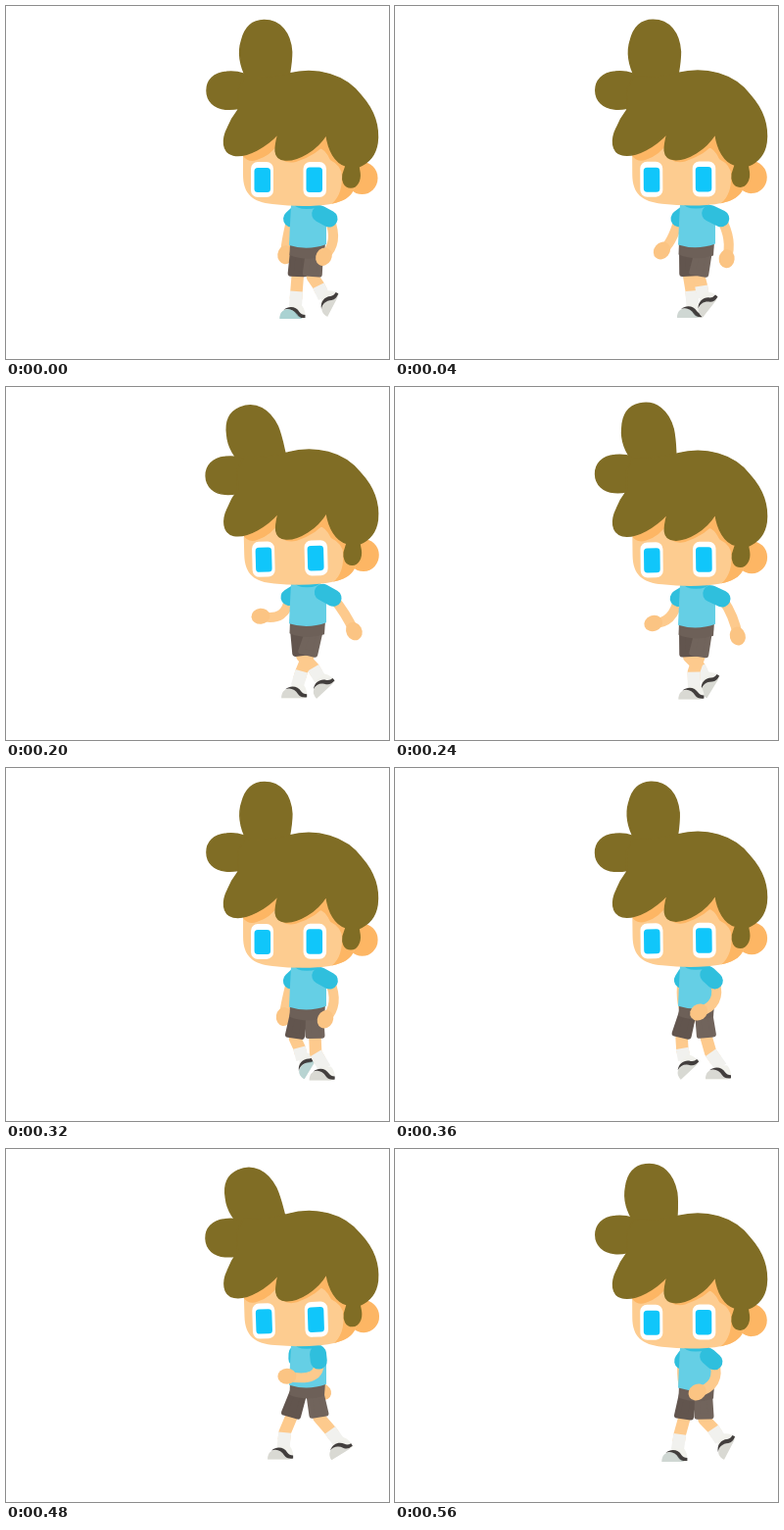
These frames come from a looping animation (391x360 px, 0.6 s). An HTML page:

```html
<!DOCTYPE html>
<html lang="en">
<head>
<meta charset="utf-8">
<title>Walking boy</title>
<style>
html, body { margin: 0; width: 100%; height: 100%; overflow: hidden; background: #fff; }
svg { display: block; width: 391px; height: 360px; }
.line { fill: none; stroke-linejoin: round; }
.skin { stroke: #fdca8d; }
.hand { fill: #fbc483; }
.sock { stroke: #f1f1ee; stroke-width: 13; }
.sleeve { stroke: #2fbfdd; stroke-width: 17; stroke-linecap: round; }
.short { stroke-width: 6; stroke-linejoin: round; }
.hair { fill: #806d25; stroke: #806d25; stroke-width: 1.5; }
.shade { fill: #fdb664; }
</style>
</head>
<body>
<svg viewBox="0 0 391 360">
  <defs>
    <clipPath id="faceClip"><path id="face" d="M242 120V172C242 192 252 200 272 202Q296 205 318 203.500C342 202 353 196 356 184L357 120Z"/></clipPath>
    <g id="shoe">
      <path d="M-13 7C-13 1 -6 -4 0 -7L9 -7C13 -3 13.500 3 13 7Z" fill="#f1f1ec"/>
      <path d="M-13 7C-13 2 -11 -1 -8 -2C-2 -4 3 0 6 4L10 7Z" fill="#d9d9d3"/>
      <path d="M-9 -2C-3 -7 4 -5 7 0Q9 3 13 3V6Q7 7 4 3C1 -2 -4 -4 -9 -2Z" fill="#423e3d"/>
    </g>
  </defs>
  <g id="farArm"></g>
  <g id="farLeg"></g>
  <g id="nearLeg"></g>
  <path id="farShort" class="short" fill="#62554e" stroke="#62554e"/>
  <path id="nearShort" class="short" fill="#71645c" stroke="#71645c"/>
  <g id="torso">
    <path d="M290 241H326L325 255Q307 261 289.500 254Z" fill="#6d6058"/>
    <path d="M291 203H321Q327 206 327 215V243Q308 250 289 244L290 222Z" fill="#65cfe5"/>
    <path d="M293 201H322Q319 207 307 207Q296 207 293 201Z" fill="#2fbfdd"/>
  </g>
  <g id="nearArm"></g>
  <g id="head">
    <ellipse cx="363.500" cy="175.500" rx="16" ry="16.500" class="shade"/>
    <use href="#face" fill="#fdcc90"/>
    <g clip-path="url(#faceClip)" class="shade">
      <path d="M327 128L318 145Q325 144 331 157Q343 163 343 174C343 190 338 200 326 206H360V130Z"/>
      <path d="M240 150Q246 161 256 157Q270 153 278 140V130H240Z"/>
      <path d="M276 150Q282 162 296 159Q318 152 328 138V128H276Z"/>
    </g>
    <g fill="#fff">
      <rect x="250" y="159" width="23" height="36" rx="7"/>
      <rect x="303.500" y="159" width="23.500" height="36" rx="7"/>
    </g>
    <g fill="#10c6fa">
      <rect x="253.500" y="165" width="16.500" height="25" rx="3.500"/>
      <rect x="306.500" y="164.500" width="16.500" height="25.500" rx="3.500"/>
    </g>
    <g class="hair">
      <path id="bun" d="M246 74C238 58 238 44 241 35C245 20 254 14.500 264 14.500C281 14.500 291 28 292 47C292 58 290 66 288 78L265 90Z"/>
      <path id="puff" d="M255 76C245 68 234 66 225 67C212 68 205 76 205 86C205 97 213 104 224 105Q234 106 248 102Z"/>
      <path d="M244 72Q264 74 289 69C317 62 347 70 363 92C377 108 381 124 379 140C377 153 370 160 360 164L361 170C362 178 358 185 352 185C345 185 343 178 344 172L347 163C336 160 329 147 327 131C317 147 298 158 285 157C271 156 275 142 278 130C266 143 246 155 232 152C220 149 221 135 226 125Q230 115 237 106V85Z"/>
    </g>
  </g>
</svg>
<script>
const LOOP = 600, STEP = 40;

// Each pose: sleeve end, elbow, hand.
const ARMS = {
  near: { shoulder: 321, sway: 2.5,
    front: [319, 216, 312, 231, 286, 231],
    rest: [331, 217, 336, 239, 329, 257],
    back: [334, 215, 346, 230, 357, 247] },
  far: { shoulder: 297, sway: 0,
    front: [289, 214, 281, 231, 259, 231],
    rest: [291, 217, 285, 239, 281, 253],
    back: [297, 214, 307, 235, 324, 247] }
};

// hem and foot are resting x places, peak is when the foot is furthest back.
const LEGS = {
  near: { hip: 315, hem: 313.5, foot: 319, stride: 24, peak: 470, kick: 4, delay: 0 },
  far: { hip: 299, hem: 297, foot: 301, stride: 21, peak: 490, kick: 0, delay: LOOP / 2 }
};

const $ = id => document.getElementById(id);
const wave = (t, peak, period = LOOP) => Math.cos((t - peak) / period * 2 * Math.PI);

function add(parent, tag, attrs) {
  const node = document.createElementNS("http://www.w3.org/2000/svg", tag);
  set(node, attrs);
  return parent.appendChild(node);
}

function set(node, attrs) {
  for (const key in attrs) node.setAttribute(key, attrs[key]);
}

// Bends through front, rest and back as s runs from -1 to 1.
function blend({ front, rest, back }, s) {
  return rest.map((m, i) => m + s * (back[i] - front[i]) / 2 + s * s * ((back[i] + front[i]) / 2 - m));
}

function makeArm(side) {
  const arm = ARMS[side], g = $(side + "Arm");
  const skin = add(g, "path", { class: "line skin", "stroke-width": 10 });
  const hand = add(g, "ellipse", { class: "hand", rx: 9.5, ry: 8 });
  const sleeve = add(g, "path", { class: "line sleeve" });
  return (t, bob) => {
    const s = wave(t, 162) * (side === "near" ? 1 : -1);
    const [x, y, ex, ey, hx, hy] = blend(arm, s);
    const sx = arm.shoulder + arm.sway * s, sy = 212 + bob;
    const cx = 2 * ex - (x + hx) / 2, cy = 2 * ey - (y + hy) / 2;
    const turn = Math.atan2(hy - ey, hx - ex) * 180 / Math.PI;
    set(skin, { d: `M${x} ${y}Q${cx} ${cy} ${hx} ${hy}` });
    set(hand, { transform: `translate(${hx} ${hy}) rotate(${turn})` });
    set(sleeve, { d: `M${sx} ${sy}L${x} ${y}` });
  };
}

function makeLeg(side) {
  const leg = LEGS[side], g = $(side + "Leg"), short = $(side + "Short");
  const skin = add(g, "path", { class: "line skin", "stroke-width": 12.5 });
  const sock = add(g, "path", { class: "line sock" });
  const foot = add(g, "g", {});
  add(foot, "use", { href: "#shoe" });
  const tint = add(foot, "path", { d: "M-13 7C-13 2 -11 -1 -8 -2C-2 -4 3 0 6 4L10 7Z", fill: "#9ed0d2" });
  return (now, bob) => {
    const t = now + leg.delay;
    const hx = leg.hem + 6.5 * wave(t, 440), hy = 276 + .7 * bob;
    const kx = hx + 2.5 + 9 * wave(t, 490), ky = 288 + 3 * wave(t, 290);
    const fx = leg.foot + leg.stride * wave(t, leg.peak) + leg.kick * wave(t, 0, LOOP / 2);
    const fy = 307 + 5 * wave(t, 280);
    const turn = -64 * Math.max(0, wave(t, -20));
    const a = turn * Math.PI / 180;
    const ax = fx + 3 * Math.cos(a) + 5 * Math.sin(a);
    const ay = fy + 3 * Math.sin(a) - 5 * Math.cos(a);
    const top = 250 + bob, skew = (hx - leg.hip) * .25;
    set(short, { d: `M${leg.hip - 6} ${top}H${leg.hip + 6}L${hx + 7} ${hy - 3 - skew}L${hx - 7} ${hy - 3 + skew}Z` });
    set(skin, { d: `M${(leg.hip + hx) / 2} ${hy - 10}L${hx} ${hy}L${kx} ${ky}L${(kx + ax) / 2} ${(ky + ay) / 2}` });
    set(sock, { d: `M${kx} ${ky}L${ax} ${ay}` });
    set(foot, { transform: `translate(${fx} ${fy}) rotate(${turn})` });
    set(tint, { opacity: side === "far" ? .8 * Math.max(0, wave(t, 0, LOOP / 2)) ** 4 : 0 });
  };
}

const limbs = [makeArm("far"), makeLeg("far"), makeLeg("near"), makeArm("near")];

function draw(t) {
  const rise = (1 - wave(t, 0, LOOP / 2)) / 2;
  const lag = (1 - wave(t, 25, LOOP / 2)) / 2;
  const bob = -3.6 * rise, tilt = -2 * rise, lean = -23 * lag ** 1.3;
  limbs.forEach(pose => pose(t, bob));
  set($("torso"), { transform: `translate(0 ${bob})` });
  set($("head"), { transform: `translate(${-tilt * .6} ${bob * .95}) rotate(${tilt} 310 160)` });
  set($("bun"), { transform: `rotate(${lean} 272 78)` });
  set($("puff"), { transform: `translate(0 ${-lean * .22})` });
}

const start = performance.now();
function tick() {
  const t = (performance.now() - start) % LOOP;
  draw(Math.floor(t / STEP) * STEP);
  requestAnimationFrame(tick);
}
tick();
</script>
</body>
</html>
```
